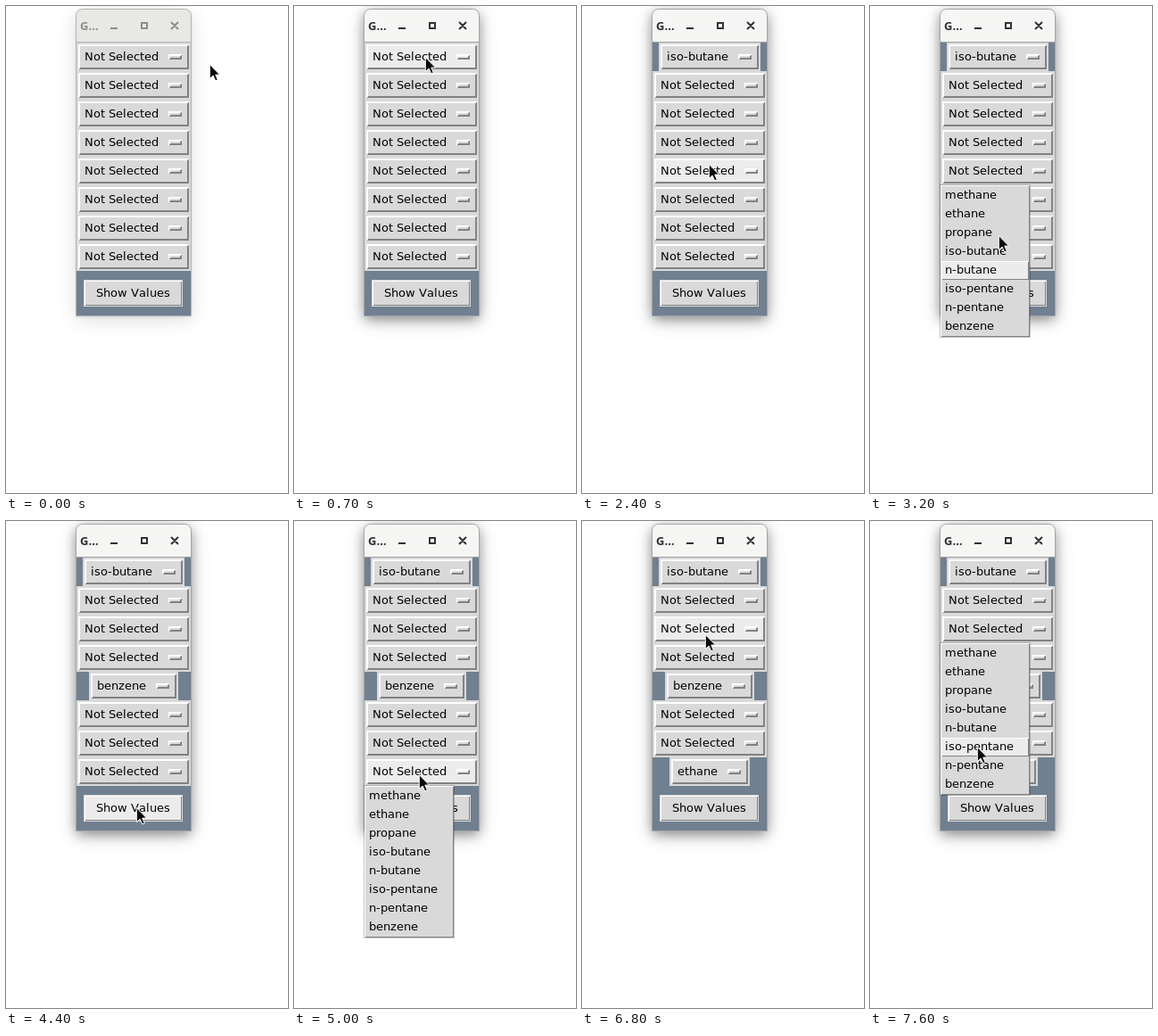
Animation, 316 px wide and 546 px high, one loop 8 s. Source, as an HTML page:

```html
<!DOCTYPE html>
<html lang="en">
<head>
<meta charset="utf-8">
<title>Option menus</title>
<style>
html, body { margin: 0; width: 100%; height: 100%; overflow: hidden; background: #fff; }
#shade {
  position: absolute; left: 79px; top: 4px; width: 128px; height: 343px; border-radius: 7px 7px 0 0;
  box-shadow: 0 1px 3px rgba(0,0,0,.2), 0 4px 22px rgba(0,0,0,.14);
}
#shade.on { box-shadow: 0 4px 14px rgba(0,0,0,.4), 0 5px 24px rgba(0,0,0,.16); }
svg { position: absolute; left: 0; top: 0; display: block; }
text { font: 13px "DejaVu Sans", sans-serif; font-kerning: none; white-space: pre; }
text.title { font: bold 13px "Open Sans", sans-serif; }
.bevel { shape-rendering: crispEdges; }
</style>
</head>
<body>
<div id="shade"></div>
<svg width="316" height="546" viewBox="0 0 316 546">
  <defs>
    <linearGradient id="bar" x1="0" y1="0" x2="0" y2="1">
      <stop offset="0" stop-color="#f6f6f5"/><stop offset="1" stop-color="#efefee"/>
    </linearGradient>
  </defs>
  <g id="ui"></g>
  <path id="arrow" d="M.3 .5V16.5L4.1 13.1L6.7 18.8L9.3 17.7L6.8 12.1H11.6Z" fill="#0a0a0a" stroke="#fff"/>
</svg>
<script>
const LOOP = 8000, STEP = 100, FOCUS_AT = 700;
const FACE = '#d9d9d9', LIT = '#ececec', DARK = '#828282', SLATE = '#708090';
const CENTER = 143, TOP = 41, ROW = 32, ITEM = 21;
const GASES = ['methane', 'ethane', 'propane', 'iso-butane', 'n-butane', 'iso-pentane', 'n-pentane', 'benzene'];

const PICKS = [
  { row: 0, open: 800, close: 1800, item: 3 },
  { row: 4, open: 2700, close: 4100, item: 7 },
  { row: 7, open: 5000, close: 6200, item: 1 },
  { row: 2, open: 7000, close: LOOP, item: 5 }
];

// Straight pointer moves: from, to, end x, end y
const MOVES = [
  [0, 400, 147, 57], [900, 1400, 134, 152], [2000, 2400, 142, 177], [3000, 3400, 146, 336],
  [3500, 3700, 146, 350], [4200, 4400, 146, 321], [4400, 4800, 140, 284], [5300, 5600, 126, 320],
  [5700, 5900, 121, 331], [6100, 6800, 138, 127], [7100, 7400, 115, 210], [7400, 7600, 120, 253]
];

const ui = document.getElementById('ui');
const arrow = document.getElementById('arrow');
const shade = document.getElementById('shade');
const pen = document.createElement('canvas').getContext('2d');

// Glyphs advance by whole pixels, as in a hinted toolkit font
const advance = ch => (pen.font = '13px "DejaVu Sans", sans-serif', Math.round(pen.measureText(ch).width));
const textWidth = str => [...str].reduce((sum, ch) => sum + advance(ch), 0);
const optionWidth = str => 2 * Math.round((textWidth(str) + 45) / 2);

const rect = (x, y, w, h, fill) => `<rect x="${x}" y="${y}" width="${w}" height="${h}" fill="${fill}"/>`;
const label = (x, y, str) => {
  const xs = [...str].map((ch, i) => x + textWidth(str.slice(0, i)));
  return `<text x="${xs.join(' ')}" y="${y}">${str}</text>`;
};
const raised = (x, y, w, h, b, fill) =>
  rect(x, y, w, h, DARK) +
  `<path class="bevel" d="M${x} ${y}h${w}l${-b} ${b}H${x + b}V${y + h - b}l${-b} ${b}Z" fill="#fff"/>` +
  rect(x + b, y + b, w - 2 * b, h - 2 * b, fill);

function frame(focused) {
  const ink = focused ? '#2e3436' : '#8b8e8f';
  const edge = focused ? '#a3a6a6' : '#b4b6b4';
  return `<path d="M78.5 347.5V10.5a7 7 0 0 1 7-7h115a7 7 0 0 1 7 7V347.5Z" fill="${focused ? 'url(#bar)' : '#e8e8e4'}" stroke="${edge}"/>` +
    rect(79, 40, 128, 1, focused ? '#a2a2a0' : '#b4b4b0') +
    rect(79, TOP, 128, 306, SLATE) +
    `<text class="title" x="83" y="27" fill="${ink}">G…</text>` +
    rect(117, 24, 8, 2, ink) +
    `<path d="M152 19h6v6h-6ZM185 18l8 8m0-8l-8 8" fill="none" stroke="${ink}" stroke-width="2"/>`;
}

function option(row, str, lit) {
  const w = optionWidth(str), x = CENTER - w / 2, y = TOP + ROW * row, fill = lit ? LIT : FACE;
  return rect(x, y, w, ROW, FACE) +
    raised(x + 2, y + 2, w - 4, ROW - 4, 2, fill) +
    label(x + 9, y + 20, str) +
    raised(x + w - 25, y + 13, 15, 6, 2, fill);
}

function showButton(lit) {
  return rect(87, 307, 111, 30, FACE) +
    raised(88, 308, 109, 28, 1, lit ? LIT : FACE) +
    label(101, 326, 'Show Values');
}

function menu(row, active) {
  const top = TOP + ROW * (row + 1);
  return `<rect x="78.5" y="${top - .5}" width="101" height="171" fill="none" stroke="#000" stroke-opacity=".22"/>` +
    raised(79, top, 100, 170, 1, FACE) +
    GASES.map((gas, i) => {
      const y = top + 1 + ITEM * i;
      return (i === active ? raised(80, y, 98, ITEM, 1, LIT) : '') + label(84, y + 14, gas);
    }).join('');
}

function pointer(t) {
  let x = 228, y = 65;
  for (const [from, to, toX, toY] of MOVES) {
    const k = Math.min(1, Math.max(0, (t - from) / (to - from)));
    x += (toX - x) * k;
    y += (toY - y) * k;
  }
  return { x: Math.round(x), y: Math.round(y) };
}

function draw(t) {
  const tip = pointer(t);
  const aim = pointer(t + STEP); // hovering runs one step ahead of the drawn arrow
  const past = PICKS.filter(p => t >= p.close);
  const open = PICKS.find(p => t >= p.open && t < p.close);
  const values = Array(8).fill('Not Selected');
  for (const p of past) values[p.row] = GASES[p.item];

  const overRow = Math.floor((aim.y - TOP) / ROW);
  const lit = row => row === overRow && (!open || open.row === row) &&
    Math.abs(aim.x - CENTER) < optionWidth(values[row]) / 2;
  const overShow = !open && aim.y >= 307 && aim.y < 337;

  let out = frame(t >= FOCUS_AT);
  values.forEach((str, row) => out += option(row, str, lit(row)));
  out += showButton(overShow);
  if (open) out += menu(open.row, Math.floor((aim.y - TOP - ROW * (open.row + 1) - 1) / ITEM));
  ui.innerHTML = out;
  arrow.setAttribute('transform', `translate(${tip.x} ${tip.y})`);
  shade.className = t >= FOCUS_AT ? 'on' : '';
}

let last = -1;
const start = performance.now();
function tick() {
  const t = Math.floor((performance.now() - start) % LOOP / STEP) * STEP;
  if (t !== last) draw(last = t);
  requestAnimationFrame(tick);
}
tick();
</script>
</body>
</html>
```
